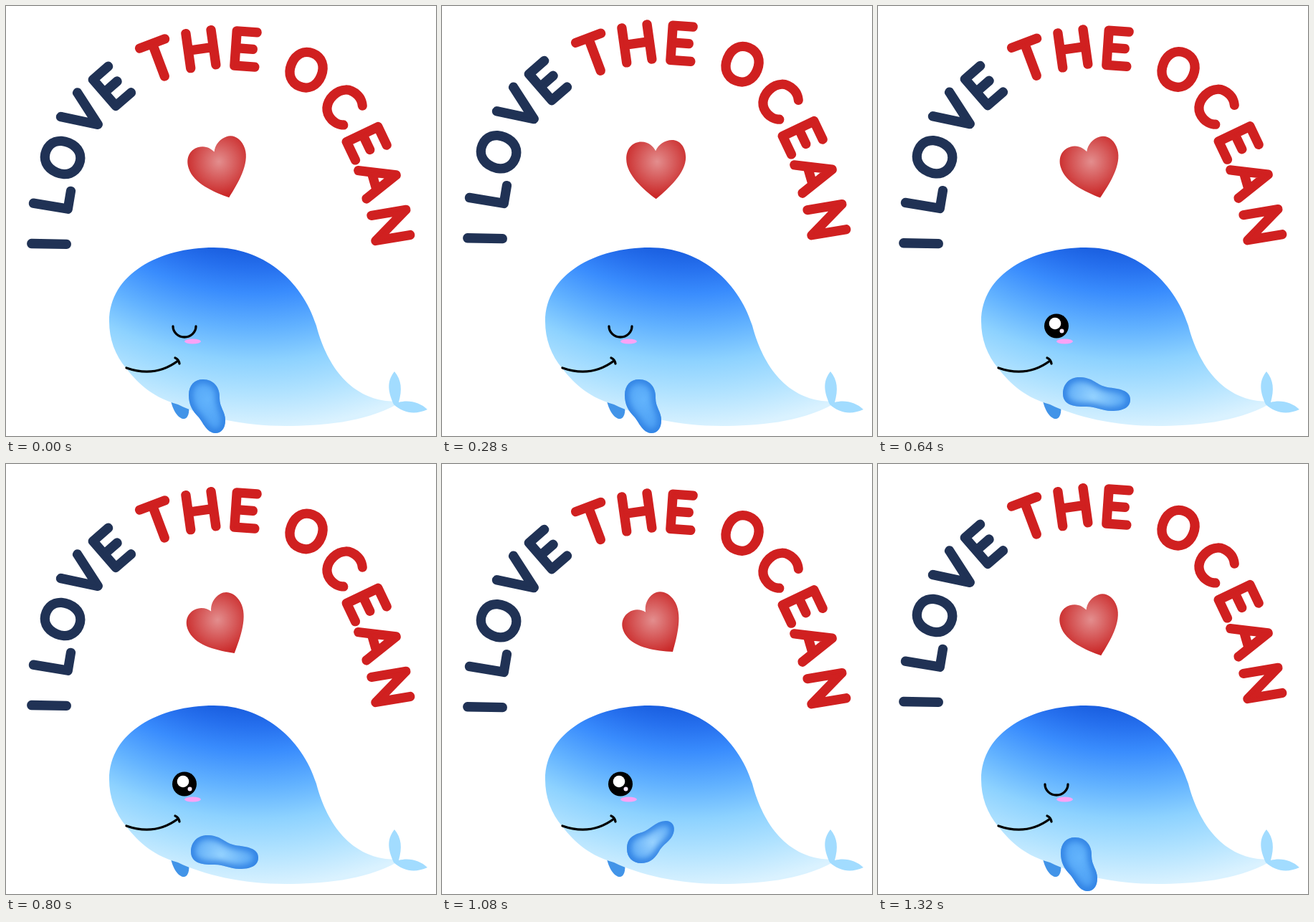
An HTML page with a canvas for the animation above (1360 ms loop, 600 px wide and 600 px high).

```html
<!DOCTYPE html>
<html lang="en">
<head>
<meta charset="utf-8">
<title>I love the ocean</title>
<style>
  html, body { margin: 0; width: 100%; height: 100%; overflow: hidden; background: #fff; }
  canvas { display: block; width: 600px; height: 600px; }
</style>
</head>
<body>
<canvas id="stage" width="600" height="600"></canvas>
<script>
const ctx = document.getElementById('stage').getContext('2d');
const LOOP = 1360, STEP = 40, SWAY = 1320, POSE = 340;
const NAVY = '#203255', RED = '#d02020', TAU = Math.PI * 2;

// letter, centre x, centre y, angle in degrees, colour
const LETTERS = [
  ['I', 60, 331.5, -89, NAVY], ['L', 64.5, 266.5, -80.5, NAVY], ['O', 79, 211.5, -67, NAVY],
  ['V', 108, 151.5, -55.5, NAVY], ['E', 148, 111.5, -41, NAVY],
  ['T', 213, 75, -20.5, RED], ['H', 272, 60, -8, RED], ['E', 335, 60, 4, RED],
  ['O', 419, 89, 22, RED], ['C', 470.5, 139, 46, RED], ['E', 503.5, 192, 64.5, RED],
  ['A', 521, 242.5, 74, RED], ['N', 537, 306, 80.5, RED]
];

const BODY = new Path2D('M144 440C144 374 214 337 290 337C356 337 412 380 433 446C442 480 466 542 530 551L545 552L545 556C500 581 440 586 390 586C330 586 275 573 240 556C200 545 180 521 168 506C152 487 144 465 144 440Z');
const TAIL = new Path2D('M541 556C534 540 530 525 542 510C552 522 553 535 548 553C562 549 578 553 588 563C570 571 555 568 541 556Z');
const BACK_FIN = new Path2D('M229 545C231 562 240 577 249 576C256 574 256 564 255 550Z');
const MOUTH = new Path2D('M168 505Q208 519 240 495M236 491Q241 493 242 499');
const HEART = new Path2D('M0 42C-18 28 -41 8 -41 -14C-41 -30 -31 -38 -20 -38C-9 -38 -3 -31 0 -25C4 -34 13 -40 23 -40C34 -40 42 -30 42 -16C42 6 18 27 0 42Z');

function radial(x, y, r, inner, outer) {
  const g = ctx.createRadialGradient(x, y, 0, x, y, r);
  g.addColorStop(0, inner);
  g.addColorStop(1, outer);
  return g;
}

function fin(path, x, y, r, light) {
  return { path: new Path2D(path), paint: radial(x, y, r, light, '#4c9ff4') };
}

// down, raised, level, half raised
const FINS = [
  fin('M255 543C255 529 263 521 275 521C290 521 299 533 298 547C298 560 306 566 306 578C306 590 300 596 292 596C280 595 276 583 269 574C260 565 255 556 255 543Z', 281, 549, 44, '#62b3fc'),
  fin('M258 535C258 520 270 517 279 510C291 500 295 479 312 478C322 478 326 487 323 497C319 511 308 518 303 532C299 547 289 556 278 556C266 556 258 547 258 535Z', 294, 521, 46, '#98d2ff'),
  fin('M258 541C258 527 268 517 283 518C301 519 305 529 320 532C336 534 352 536 352 549C352 561 341 565 326 565C312 565 305 559 291 559C271 560 258 555 258 541Z', 300, 546, 54, '#94d2ff'),
  fin('M258 537C258 521 268 517 279 514C291 510 297 499 312 498C321 498 326 505 323 515C320 526 308 530 302 542C296 552 288 557 278 557C266 557 258 549 258 537Z', 294, 528, 42, '#98d2ff')
];

const bodyPaint = ctx.createRadialGradient(350, 40, 301, 350, 40, 549);
[[0, '#1a5fe0'], [.1, '#2670ee'], [.24, '#398cfd'], [.44, '#62b2ff'],
 [.62, '#8dd2ff'], [.8, '#b0e2ff'], [1, '#daf2ff']]
  .forEach(([at, colour]) => bodyPaint.addColorStop(at, colour));
const heartPaint = radial(2, -10, 48, '#e38e8e', '#ca2828');

// Thin capitals with a round outline make heavy, rounded strokes.
const HEIGHT = 62, WEIGHT = 14.7;
const face = size => `100 ${size}px Lato, sans-serif`;
ctx.font = face(1000);
const bar = ctx.measureText('I');
const stem = (bar.actualBoundingBoxLeft + bar.actualBoundingBoxRight) / 1000;
const cap = bar.actualBoundingBoxAscent / 1000;
const fontSize = (HEIGHT - WEIGHT) / (cap - stem);
const outline = WEIGHT - fontSize * stem;

function ellipse(x, y, rx, ry, colour) {
  ctx.fillStyle = colour;
  ctx.beginPath();
  ctx.ellipse(x, y, rx, ry, 0, 0, TAU);
  ctx.fill();
}

function fill(path, paint) {
  ctx.fillStyle = paint;
  ctx.fill(path);
}

function drawLetters(dy) {
  ctx.font = face(fontSize);
  ctx.lineWidth = outline;
  for (const [char, x, y, angle, colour] of LETTERS) {
    const m = ctx.measureText(char);
    const left = (m.actualBoundingBoxLeft - m.actualBoundingBoxRight) / 2;
    ctx.save();
    ctx.translate(x, y + dy);
    ctx.rotate(angle * TAU / 360);
    ctx.fillStyle = ctx.strokeStyle = colour;
    ctx.strokeText(char, left, fontSize * cap / 2);
    ctx.fillText(char, left, fontSize * cap / 2);
    ctx.restore();
  }
}

function drawHeart(degrees) {
  ctx.save();
  ctx.translate(298.3, 227.3);
  ctx.rotate(degrees * TAU / 360);
  fill(HEART, heartPaint);
  ctx.restore();
}

// Soft dark rim inside the outline.
function drawFin({ path, paint }) {
  fill(path, paint);
  ctx.save();
  ctx.clip(path);
  ctx.filter = 'blur(4px)';
  ctx.strokeStyle = '#2f80e2';
  ctx.lineWidth = 10;
  ctx.stroke(path);
  ctx.restore();
}

function drawWhale(pose) {
  fill(BACK_FIN, '#4294e8');
  fill(BODY, bodyPaint);
  fill(TAIL, '#a2dcff');
  ctx.strokeStyle = '#000';
  ctx.lineWidth = 3.3;
  ctx.stroke(MOUTH);
  ellipse(260.5, 468, 11.5, 3.5, '#f9a3f6');
  if (pose === 0) {
    ctx.beginPath();
    ctx.ellipse(249, 447, 16, 15, 0, 0, Math.PI);
    ctx.stroke();
  } else {
    ellipse(249, 446.5, 17, 17, '#000');
    ellipse(247, 443, 8.3, 8.3, '#fff');
    ellipse(256.5, 453.5, 3, 3, '#fbeaff');
  }
  drawFin(FINS[pose]);
}

function draw(now) {
  const t = Math.floor(now % LOOP / STEP) * STEP;
  const wave = Math.sin(TAU * t / SWAY);
  ctx.fillStyle = '#fff';
  ctx.fillRect(0, 0, 600, 600);
  ctx.lineJoin = ctx.lineCap = 'round';
  drawLetters(-8 * wave);
  drawHeart(18 * (wave - 1));
  drawWhale(Math.floor((t + STEP) / POSE) % FINS.length);
  requestAnimationFrame(() => draw(performance.now() - start));
}

const start = performance.now();
draw(0);
</script>
</body>
</html>
```
